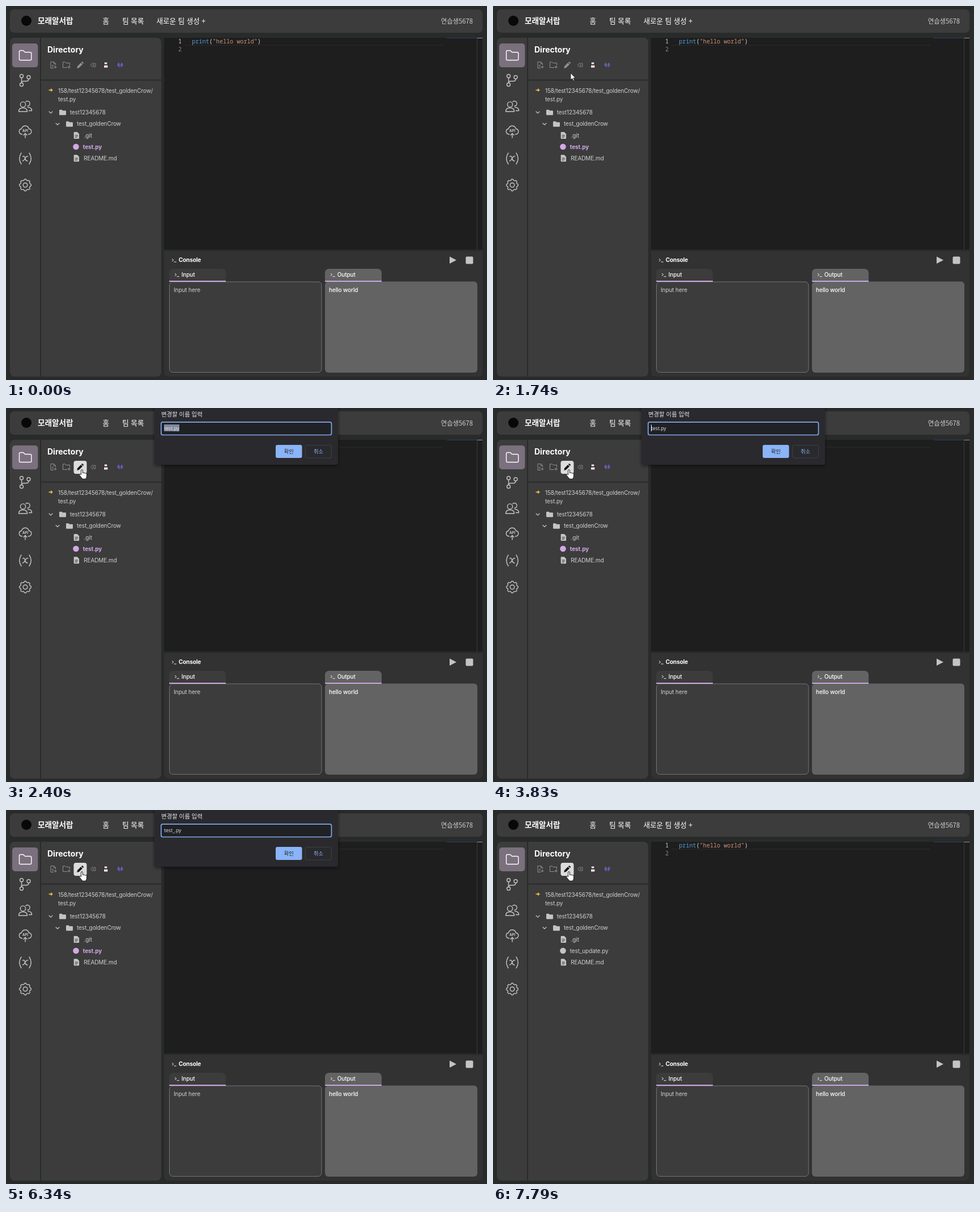
These frames come from a looping animation (849x659 px, 8 s). An HTML page:

```html
<!DOCTYPE html>
<html lang="ko">
<head>
<meta charset="utf-8">
<title>Web IDE</title>
<style>
  html, body { margin: 0; width: 100%; height: 100%; overflow: hidden; background: #292b2b; }
  svg { display: block; width: 849px; height: 659px; }
  text { font: 10px Inter, "Noto Sans CJK KR", "Noto Sans CJK", sans-serif; letter-spacing: -.1px; fill: #d0d0d0; white-space: pre; }
  .ko { font-family: "Noto Sans CJK KR", "Noto Sans CJK", sans-serif; letter-spacing: 0; }
  .nav { font-size: 12.55px; font-weight: 500; fill: #fff; }
  .brand { font-size: 13.6px; font-weight: 700; fill: #fff; }
  .bold { font-weight: 700; fill: #fff; }
  .mid { font-weight: 500; fill: #fff; }
  .code { font: 10.15px "Noto Sans Mono", "DejaVu Sans Mono", monospace; letter-spacing: 0; }
  .field { font: 8.55px "Open Sans", "Noto Sans", sans-serif; letter-spacing: 0; fill: #e8eaed; }
  .line { fill: none; stroke: #c6c6c6; stroke-width: 1.4; stroke-linecap: round; stroke-linejoin: round; }
  .tool { fill: none; stroke: #919191; stroke-width: 1; stroke-linejoin: round; }
  .solid { fill: #c4c4c4; }
</style>
</head>
<body>
<svg viewBox="0 0 849 659">
  <defs>
    <filter id="shade" x="-10%" y="-10%" width="120%" height="130%">
      <feDropShadow dx="0" dy="2" stdDeviation="3" flood-opacity=".5"/>
    </filter>
    <path id="dir" d="M0 1.2Q0 0 1.2 0H4.6L6 1.5H10.8Q12 1.5 12 2.7V8.3Q12 9.5 10.8 9.5H1.2Q0 9.5 0 8.3z"/>
    <g id="doc">
      <path class="solid" d="M0 1.2Q0 0 1.2 0H6L9.4 3.4V10.8Q9.4 12 8.2 12H1.2Q0 12 0 10.8z"/>
      <path d="M2.2 5.6H7.2M2.2 7.6H7.2M2.2 9.6H5.6" stroke="#3c3c3c" stroke-width=".9"/>
    </g>
    <path id="chevron" class="line" style="stroke-width:1.1" d="M-3 -1.5L0 1.5L3 -1.5"/>
    <path id="prompt" d="M0 0L2.8 2.2L0 4.4M3.6 5.5H7.6" fill="none" stroke="#eee" stroke-width="1"/>
  </defs>

  <rect width="849" height="659" fill="#292b2b"/>

  <!-- header -->
  <rect x="7" y="6" width="834" height="41" rx="7" fill="#3c3c3c"/>
  <circle cx="36" cy="26" r="9" fill="#080808"/>
  <text class="ko brand" x="56" y="31">모래알서랍</text>
  <text class="ko nav" x="170.5" y="30.5">홈</text>
  <text class="ko nav" x="205.3" y="30.5">팀 목록</text>
  <text class="ko nav" x="265.5" y="30.5">새로운 팀 생성 +</text>
  <text class="ko" x="824" y="30.5" text-anchor="end" style="font-size:11.3px">연습생5678</text>

  <!-- sidebar -->
  <path d="M60 56V653H16Q7 653 7 644V65Q7 56 16 56z" fill="#3c3c3c"/>
  <rect x="11" y="66" width="45.3" height="42" rx="5" fill="#7b707d"/>
  <path class="line" style="stroke:#fff" d="M23.5 80.5Q23.5 78.5 25.5 78.5H30.5L33.5 81.5H42.5Q44.8 81.5 44.8 83.5V93.5Q44.8 95.5 42.8 95.5H25.5Q23.5 95.5 23.5 93.5z"/>
  <g class="line">
    <circle cx="27.5" cy="123.5" r="3"/><circle cx="40" cy="125.5" r="3"/><circle cx="27.5" cy="138.5" r="3"/>
    <path d="M27.5 126.5V135.5M40 128.5Q40 132.5 36 132.5H31Q27.5 132.5 27.5 135"/>
    <circle cx="30" cy="173.5" r="4.6"/>
    <path d="M22.5 186Q22.5 179.5 30 179.5T37.5 186z"/>
    <path d="M35 168.5A4.4 4.4 0 1 1 38 176.3M38.5 178.5Q45.5 178.5 45.5 184.5H40.5"/>
    <path d="M28.5 226H28Q23.3 225.5 23.3 221Q23.5 217 27.2 216.5Q29 211.3 34 211.3T40.6 216.5Q44.7 217 44.8 221.2Q44.7 225.5 40 226H39.5M34 232V225M31 227.5L34 224.6L37 227.5"/>
    <path d="M27 259Q20.5 268.5 27 278.5M41 259Q47.5 268.5 41 278.5M29.5 265.2Q32.5 263 33.5 268T38 273M38.5 264.7Q36 264 33.7 268.5T29.3 273"/>
    <path id="gear"/><circle cx="34" cy="315.5" r="3.8"/>
  </g>
  <text x="34" y="222" text-anchor="middle" style="font-size:6px;font-weight:700">API</text>

  <!-- directory -->
  <path d="M62 56H265Q274 56 274 65V644Q274 653 265 653H62z" fill="#3c3c3c"/>
  <rect x="62" y="129.5" width="212" height="2" fill="#292b2b"/>
  <text class="bold" x="73" y="81.5" style="font-size:14px;letter-spacing:0">Directory</text>
  <g class="tool">
    <path d="M84 109.5H79V98.5H84.5L87.5 101.5V104M84.3 98.5V101.7H87.5M81 104.5H84M81 106.7H83.5M84.5 107.5H89.5M87 105V110"/>
    <path d="M108 108.5H100.5V98.8H104.5L106 100.5H112.5V104.5M108.5 107.5H114M111.2 104.8V110.3"/>
    <path d="M149.5 104L152 101H158V107H152zM153 102.5L156 105.5M156 102.5L153 105.5" stroke-width=".8"/>
  </g>
  <rect id="penBack" x="119.5" y="93" width="23" height="23" rx="4" fill="#dcdcdc"/>
  <path id="pen" d="M125.3 109.8L126 106.3L132.2 100.1L135 102.9L128.8 109.1zM133 99.3L134.2 98.1Q134.7 97.8 135.2 98.2L136.9 99.9Q137.3 100.4 136.9 100.9L135.8 102.1z"/>
  <path d="M172 99.5H179L180.5 101V109H172z" fill="#2e2833"/>
  <path d="M173.7 99.5H178.5V102.5H173.7zM173 104.3H179.5V108.5H173z" fill="#eee"/>
  <path d="M173 104.3H179.5V105.3H173z" fill="#c8605c"/>
  <path d="M198.7 99.5Q203 103 199.5 108.8Q199.5 106.5 197.5 106Q194.8 103.5 198.7 99.5zM204.3 99.5Q208.5 103.5 205.5 106Q203.5 106.5 203.5 108.8Q200.2 103 204.3 99.5z" fill="#6a57ad"/>
  <path d="M75.5 148.2H81.5M79 145.8L81.7 148.2L79 150.6" fill="none" stroke="#f3c54b" stroke-width="1.4"/>
  <text x="92" y="153.3">158/test12345678/test_goldenCrow/</text>
  <text x="92" y="168">test.py</text>
  <rect id="rowHover" height="20.5" rx="4" fill="#37414d"/>
  <use href="#chevron" x="79" y="187.5"/><use href="#dir" class="solid" x="94" y="182.7"/>
  <text x="112.8" y="191">test12345678</text>
  <use href="#chevron" x="91" y="208"/><use href="#dir" class="solid" x="106" y="203.2"/>
  <text x="125" y="211.4">test_goldenCrow</text>
  <use href="#doc" x="119.7" y="222"/><text x="137.5" y="231.7">.git</text>
  <circle id="pyIcon" cx="123.5" cy="248" r="5.3"/>
  <text id="pyName" x="135.7" y="251.8"></text>
  <use href="#doc" x="119.7" y="262.3"/><text x="137.2" y="272">README.md</text>

  <!-- editor -->
  <rect x="279" y="56" width="562" height="373" fill="#1e1e1e"/>
  <path d="M316 69H772" stroke="#2c2c2c"/>
  <path d="M831.5 56V429" stroke="#3b3b3b"/>
  <path d="M778 56.5H831" stroke="#2c3f66"/>
  <path d="M832 56.5H841" stroke="#999"/>
  <text class="code" x="310" y="66" text-anchor="end" style="fill:#d0d0d0">1</text>
  <text class="code" x="310" y="79.7" text-anchor="end" style="fill:#858585">2</text>
  <text class="code" x="328.3" y="66"><tspan fill="#569cd6">print</tspan><tspan fill="#dcdcdc">(</tspan><tspan fill="#ce9178">"hello world"</tspan><tspan fill="#dcdcdc">)</tspan></text>

  <!-- console -->
  <path d="M279 432H841V644Q841 653 832 653H288Q279 653 279 644z" fill="#323232"/>
  <use href="#prompt" x="293" y="445.5"/>
  <text class="bold" x="304.7" y="451">Console</text>
  <path class="solid" d="M783 441.5L795 447.8L783 454z"/>
  <rect class="solid" x="811.5" y="441.5" width="13" height="13" rx="2"/>
  <path d="M288 486V471Q288 463 296 463H380Q388 463 388 471V486z" fill="#3c3c3c"/>
  <path d="M563 486V471Q563 463 571 463H655Q663 463 663 471V486z" fill="#636363"/>
  <rect x="288.5" y="486" width="268.5" height="159.5" rx="6" fill="#3c3c3c" stroke="#77727c"/>
  <rect x="563" y="485.5" width="269" height="160.5" rx="6" fill="#636363"/>
  <path d="M288 485H388M563 485H663" stroke="#cda6e0" stroke-width="2"/>
  <use href="#prompt" x="298" y="471.2"/><text class="mid" x="309.7" y="477">Input</text>
  <use href="#prompt" x="573" y="471.2"/><text class="mid" x="584.7" y="477">Output</text>
  <text x="296" y="504.3">Input here</text>
  <text class="mid" x="570" y="503.5">hello world</text>

  <!-- rename prompt -->
  <g id="dialog">
    <path d="M262 -10H586V96Q586 100 582 100H266Q262 100 262 96z" fill="#292a2d" filter="url(#shade)"/>
    <text class="ko" x="274" y="15" style="font-size:10.4px;fill:#e8eaed">변경할 이름 입력</text>
    <rect x="273.8" y="24.8" width="300.7" height="22.7" rx="3" fill="#202124" stroke="#80a9ea" stroke-width="1.7"/>
    <rect id="marked" x="279" y="29" width="27" height="12" fill="#7f8a9c"/>
    <text id="field" class="field" x="279" y="38.7"></text>
    <rect id="caret" y="29.5" width="1" height="11.5" fill="#fff"/>
    <rect x="476" y="65" width="46.5" height="23" rx="3" fill="#8ab4f8"/>
    <text class="ko" x="499.2" y="79.7" text-anchor="middle" style="font-size:9.2px;fill:#202124">확인</text>
    <rect x="528.5" y="65.5" width="46" height="22.5" rx="3" fill="none" stroke="#3c4043"/>
    <text class="ko" x="551.5" y="79.7" text-anchor="middle" style="font-size:9.2px;fill:#8ab4f8">취소</text>
  </g>

  <g id="pointer">
    <path id="arrow" d="M0 0V12.2L2.8 9.6L4.8 14L6.7 13.2L4.8 8.9H8.6z" fill="#fff" stroke="#111" stroke-width=".8"/>
    <path id="beam" d="M-2.5 -7H2.5M0 -7V7M-2.5 7H2.5" fill="none" stroke="#ddd"/>
    <path id="hand" d="M-1.4 8.6V1a1.4 1.4 0 0 1 2.8 0V5.6a1.3 1.3 0 0 1 2.5 .4a1.3 1.3 0 0 1 2.4 .5a1.2 1.2 0 0 1 2.2 .7V11q0 2-1.3 3.6V16H.3V14.8Q-1.6 13-4 9.4q-.8-1.4.3-2q1.1-.4 2.3 1.2z" fill="#fff" stroke="#111" stroke-width=".9"/>
  </g>
</svg>
<script>
const LOOP = 8000;
const $ = id => document.getElementById(id);
const show = (id, on) => $(id).setAttribute("visibility", on ? "inherit" : "hidden");
const set = (id, attrs) => { for (const k in attrs) $(id).setAttribute(k, attrs[k]); };
const last = (list, t) => list.reduce((found, item) => item[0] <= t ? item : found, null);

// [time, x, y]: a sweep in from the lower right, then up to the toolbar
const sweep = [0, .1, .26, .46, .65, .81, .92, .98, 1];
const moves = [
  ...sweep.map((p, i) => [80 + 90 * i, 713 - 568 * p, 644 - 396 * p]),
  [1500, 144, 245], [1580, 140, 209], [1660, 138, 154], [1740, 137, 118],
  [1830, 135, 111], [1910, 134, 109], [2240, 134, 108], [2330, 134, 109]
];

// [time, typed text before ".py", caret index or -1]
const edits = [
  [2240, "test", -1], [3830, "test", 0], [4330, "test", -1], [4500, "test", 1],
  [4580, "test", 3], [5000, "test", 4], [5510, "test", -1],
  [5840, "test_", 5], [6340, "test_", -1], [6430, "test_u", 6], [6510, "test_up", 7],
  [6600, "test_upd", 8], [6770, "test_upda", 9], [6940, "test_updat", 10],
  [7110, "test_update", 11], [7610, "test_update", -1]
];

// [time, opacity, vertical shift, scale]
const fades = [
  [0, 0, 0, 1], [2240, .65, -6, 1.007], [2330, .94, -1, 1.001],
  [2400, 1, 0, 1], [7700, .5, -6, 1.007], [7790, 0, 0, 1]
];

// [left edge, top] of every tree row
const rows = [[73, 177.5], [85.5, 197.7], [98, 217.8], [98, 238], [98, 258.2]];
const inside = (x, y, l, t, r, b) => x >= l && x < r && y >= t && y < b;

function drawGear() {
  let d = "";
  for (let i = 0; i < 160; i++) {
    const a = i / 160 * Math.PI * 2;
    const r = 9.45 + .9 * Math.tanh(2 * Math.cos(8 * a));
    d += (i ? "L" : "M") + (34 + r * Math.sin(a)).toFixed(2) + " " + (315.5 - r * Math.cos(a)).toFixed(2);
  }
  $("gear").setAttribute("d", d + "z");
}

function drawPointer(t) {
  const at = last(moves, t);
  show("pointer", at);
  const [, x, y] = at || [0, -99, -99];
  const row = rows.find(([l, top]) => inside(x, y, l, top, 263, top + 20.2));
  const onPen = inside(x, y, 119, 93, 143, 116);
  const onText = inside(x, y, 288, 486, 557, 646) || inside(x, y, 279, 56, 831, 429);
  const kind = row || onPen ? "hand" : onText ? "beam" : "arrow";
  for (const id of ["hand", "beam", "arrow"]) show(id, at && id === kind);
  set("pointer", { transform: `translate(${x} ${y})` });
  show("rowHover", row);
  if (row) set("rowHover", { x: row[0], y: row[1], width: 263 - row[0] });
  show("penBack", onPen);
  set("pen", { fill: onPen ? "#151515" : "#919191" });
}

function drawDialog(t) {
  const [, opacity, dy, scale] = last(fades, t);
  show("dialog", opacity > 0);
  set("dialog", { opacity, transform: `translate(424 ${dy}) scale(${scale}) translate(-424 0)` });
  const [, name, caret] = last(edits, t) || edits[0];
  const field = $("field");
  const value = name + ".py";
  if (field.textContent !== value) field.textContent = value;
  show("marked", opacity > 0 && t < 3830);
  show("caret", opacity > 0 && caret >= 0);
  set("caret", { x: 279 + (caret > 0 ? Math.round(field.getSubStringLength(0, caret)) : 0) });
}

function drawFile(t) {
  const renamed = t >= 7790;
  const color = renamed ? "#c4c4c4" : "#d2a8e6";
  $("pyName").textContent = renamed ? "test_update.py" : "test.py";
  $("pyName").style.cssText = `fill:${renamed ? "#d0d0d0" : color};font-weight:${renamed ? 400 : 700}`;
  set("pyIcon", { fill: color });
}

function draw(t) {
  drawPointer(t);
  drawDialog(t);
  drawFile(t);
}

drawGear();
const start = performance.now();
function tick() {
  draw((performance.now() - start) % LOOP);
  requestAnimationFrame(tick);
}
tick();
</script>
</body>
</html>
```
